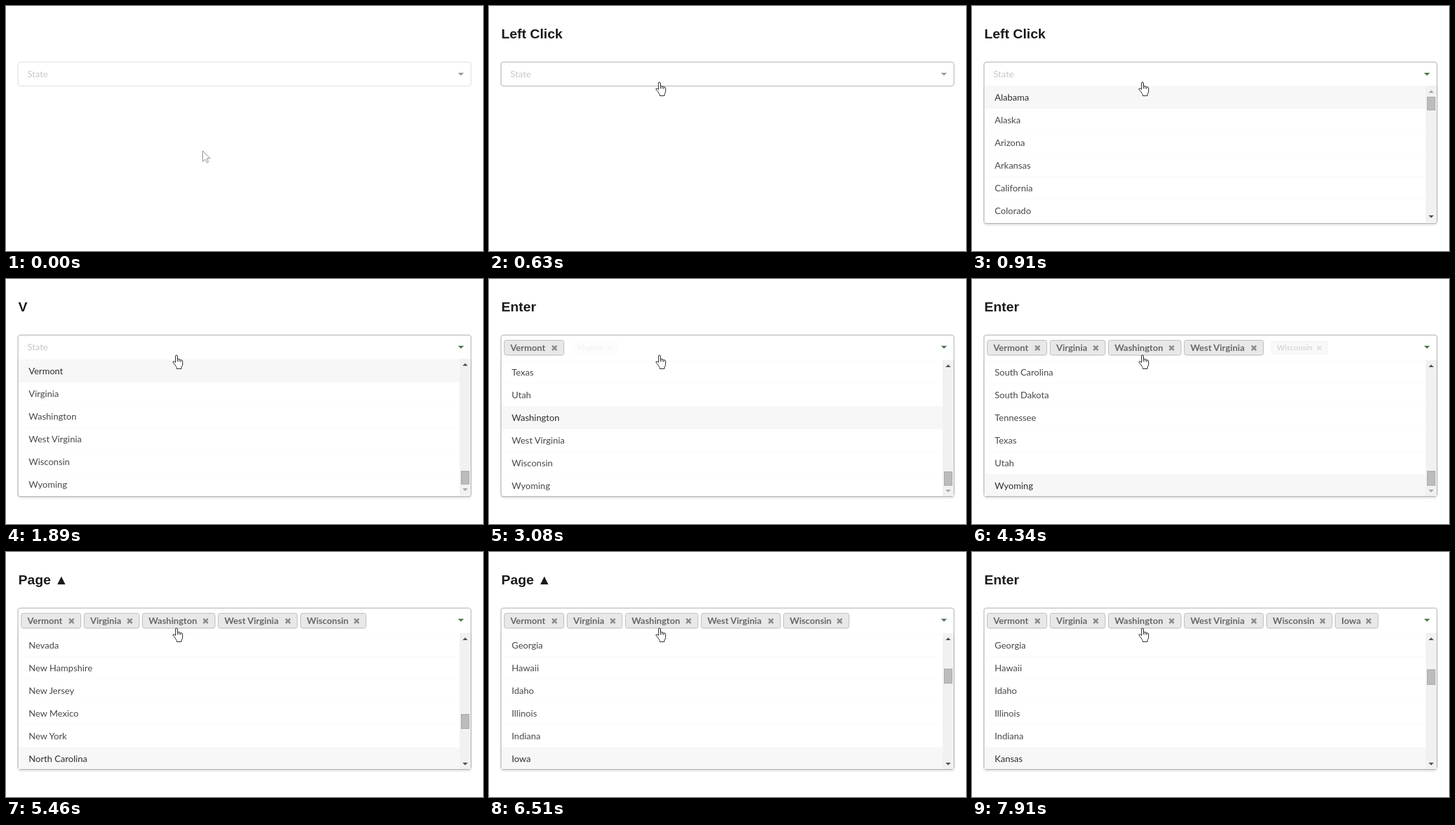
Animation of 736x378 px, one loop 8 s. Source, as an HTML page:

```html
<!DOCTYPE html>
<html lang="en">
<head>
<meta charset="utf-8">
<title>Keyboard dropdown</title>
<style>
html, body { margin: 0; width: 100%; height: 100%; overflow: hidden; background: #fff; }
svg { display: block; width: 736px; height: 378px; }
text { font: 14px Lato, sans-serif; fill: #484848; white-space: pre; }
#title { font: bold 21px "Liberation Sans", Arial, sans-serif; fill: #1b1b1b; }
#hint { fill: #c7c7c7; }
#frame { filter: drop-shadow(0 2px 1.5px rgba(34, 36, 38, .15)); }
.chip text { font-weight: 700; fill: #686868; }
.chip rect { fill: #e8e8e8; stroke: #bcbcbc; }
.chip path { stroke: #8c8c8c; stroke-width: 2.6; }
.line { fill: #fafafa; }
.active { fill: #f7f7f7; }
.active + text { fill: #2e2e2e; }
</style>
</head>
<body>
<svg viewBox="0 0 736 378">
  <defs><clipPath id="clip"><rect id="clipBox" x="19" width="698"/></clipPath></defs>
  <text id="title" x="19" y="50"></text>
  <path id="field" fill="#fff"/>
  <text id="hint" x="33" y="110">State</text>
  <path id="caret" d="M697.5 103h9l-4.500 4.500z"/>
  <g id="chips"></g>
  <g id="menu">
    <path id="frame" fill="#fff" stroke="#adadad"/>
    <g clip-path="url(#clip)">
      <g id="rows"></g>
      <rect id="track" x="700" width="17" height="211" fill="#f1f1f1"/>
      <rect id="thumb" x="702.5" width="12" fill="#bcbcbc" stroke="#a8a8a8"/>
      <path id="up"/>
      <path id="down"/>
    </g>
  </g>
  <path id="arrow" d="M.5 .5V17L4.300 13.400L7 18.700L9.300 17.800L7 12.200H12Z" fill="#fff" stroke="#8a8a8a"/>
  <g id="hand" stroke="#222" stroke-linejoin="round">
    <path fill="#fff" d="M4.500 2Q4.500 .5 6 .5Q7.500 .5 7.500 2V6.500Q8.900 5.600 10 7Q11.700 6.300 12.600 7.900Q15.500 7.500 15.500 10V15Q15.500 17 13.500 19V21.500H6.500V19.500Q5 17.500 3.500 15L.8 12Q.2 10 2 10Q3 10 4.500 12Z"/>
    <path fill="none" d="M7.500 6.500v4M10 7v3.500M12.600 8v3"/>
  </g>
</svg>
<script>
const LOOP = 8000, TICK = 70, ROW = 35, VIEW = 211, BAR = 17;

const states = ("Alabama,Alaska,Arizona,Arkansas,California,Colorado,Connecticut,Delaware," +
  "District Of Columbia,Florida,Georgia,Hawaii,Idaho,Illinois,Indiana,Iowa,Kansas,Kentucky," +
  "Louisiana,Maine,Maryland,Massachusetts,Michigan,Minnesota,Mississippi,Missouri,Montana," +
  "Nebraska,Nevada,New Hampshire,New Jersey,New Mexico,New York,North Carolina,North Dakota," +
  "Ohio,Oklahoma,Oregon,Pennsylvania,Rhode Island,South Carolina,South Dakota,Tennessee,Texas," +
  "Utah,Vermont,Virginia,Washington,West Virginia,Wisconsin,Wyoming").split(",");

const titles = [[0, ""], [630, "Left Click"], [1540, "V"], [2380, "Enter"],
  [4900, "Page ▲"], [7070, "▲"], [7420, "▼"], [7770, "Enter"]];

// time, highlighted row, row aligned with the bottom of the menu
const moves = [[0, 0, 5], [1680, 45, 50], [2520, 45, 49], [3080, 45, 48], [3500, 45, 47],
  [3920, 45, 46], [4340, 45, 45], [5040, 39, 39], [5460, 33, 33], [5740, 27, 27],
  [6090, 21, 21], [6510, 15, 15], [7140, 14, 15], [7420, 15, 15], [7770, 15, 15]];

const slow = [.07, .4, .8, 1], fast = [.25, .7, 1];
// time, name, left, width, fade
const picks = [[2520, "Vermont", 23, 93, slow], [3080, "Virginia", 120, 86, slow],
  [3500, "Washington", 210, 113, slow], [3920, "West Virginia", 327, 123, fast],
  [4340, "Wisconsin", 454, 102, fast], [7770, "Iowa", 560, 67, fast]];

const $ = id => document.getElementById(id);
const last = (table, t) => table.filter(row => row[0] <= t).pop();
const phase = (steps, t, from) => t < from ? 0 : steps[Math.min(steps.length - 1, Math.round((t - from) / TICK))];

function set(el, attrs) {
  for (const key in attrs) el.setAttribute(key, attrs[key]);
  return el;
}

function add(parent, tag, attrs, text) {
  const el = set(document.createElementNS("http://www.w3.org/2000/svg", tag), attrs);
  if (text) el.textContent = text;
  return parent.appendChild(el);
}

const chips = picks.map(([, name, x, w]) => {
  const g = add($("chips"), "g", { class: "chip" });
  const cross = x + w - 18.5;
  add(g, "rect", { x: x + .5, y: 94.5, width: w - 1, height: 23, rx: 3 });
  add(g, "text", { x: x + 10, y: 111 }, name);
  add(g, "path", { d: `M${cross} 103l7 7m0 -7l-7 7` });
  return g;
});

function drawList(t, top) {
  const [, active, bottom] = last(moves, t);
  const taken = picks.filter(p => p[0] <= t).map(p => p[1]);
  const list = states.filter(s => !taken.includes(s));
  const total = list.length * ROW;
  const scroll = Math.max(0, (bottom + 1) * ROW - VIEW);
  const rows = $("rows");
  rows.textContent = "";
  list.forEach((name, i) => {
    const y = top + i * ROW - scroll;
    if (y < top - ROW || y > top + VIEW) return;
    if (i) add(rows, "rect", { class: "line", x: 19, y, width: 681, height: 1 });
    if (i === active) add(rows, "rect", { class: "active", x: 19, y, width: 681, height: ROW });
    add(rows, "text", { x: 35, y: y + 23 }, name);
  });

  const room = VIEW - 2 * BAR;
  const shade = on => on ? "#505050" : "#a3a3a3";
  set($("track"), { y: top });
  set($("thumb"), {
    y: Math.round(top + BAR + room * scroll / total) + .5,
    height: Math.round(room * VIEW / total) - 1
  });
  set($("up"), { d: `M704.5 ${top + 11}h8l-4 -4z`, fill: shade(scroll > 0) });
  set($("down"), { d: `M704.5 ${top + VIEW - 11}h8l-4 4z`, fill: shade(scroll < total - VIEW) });
}

function draw(t) {
  const open = phase([.3, .75, 1], t, 770);
  const filled = t >= picks[0][0];
  const top = filled ? 125 : 123;
  const r = open ? 0 : 3.5;

  $("title").textContent = last(titles, t)[1];
  set($("hint"), { visibility: filled ? "hidden" : "visible" });
  set($("caret"), { fill: open ? "#4b7a48" : "#999" });
  set($("field"), {
    d: `M22 86.500H714q3.500 0 3.500 3.500V${top + .5 - r}q0 ${r} ${-r} ${r}H${18.5 + r}q${-r} 0 ${-r} ${-r}V90q0 -3.500 3.500 -3.500z`,
    stroke: t >= 420 ? "#adadad" : "#dededf"
  });

  set($("menu"), {
    visibility: open ? "visible" : "hidden",
    opacity: open,
    transform: `translate(0 ${top}) scale(1 ${open || 1}) translate(0 ${-top})`
  });
  if (open) {
    set($("frame"), { d: `M18.500 ${top}V332q0 3.500 3.500 3.500H714q3.500 0 3.500 -3.500V${top}` });
    set($("clipBox"), { y: top, height: 335 - top });
    drawList(t, top);
  }

  picks.forEach(([from, , x, w, fade], i) => {
    const k = phase(fade, t, from), s = .8 + .2 * k, cx = x + w / 2;
    set(chips[i], { opacity: k, transform: `translate(${cx} 106) scale(${s}) translate(${-cx} -106)` });
  });

  const p = phase([.1, .35, .7, .95, 1], t, 210);
  const x = Math.round(303 - 41 * p), y = Math.round(223 - 106 * p);
  const over = p > .9;
  set($("arrow"), { transform: `translate(${x} ${y})`, visibility: over ? "hidden" : "visible" });
  set($("hand"), { transform: `translate(${x - 5} ${y})`, visibility: over ? "visible" : "hidden" });
}

const start = performance.now();
let shown = -1;
function tick() {
  const t = Math.floor((performance.now() - start) % LOOP / TICK) * TICK;
  if (t !== shown) draw(shown = t);
  requestAnimationFrame(tick);
}
tick();
</script>
</body>
</html>
```
